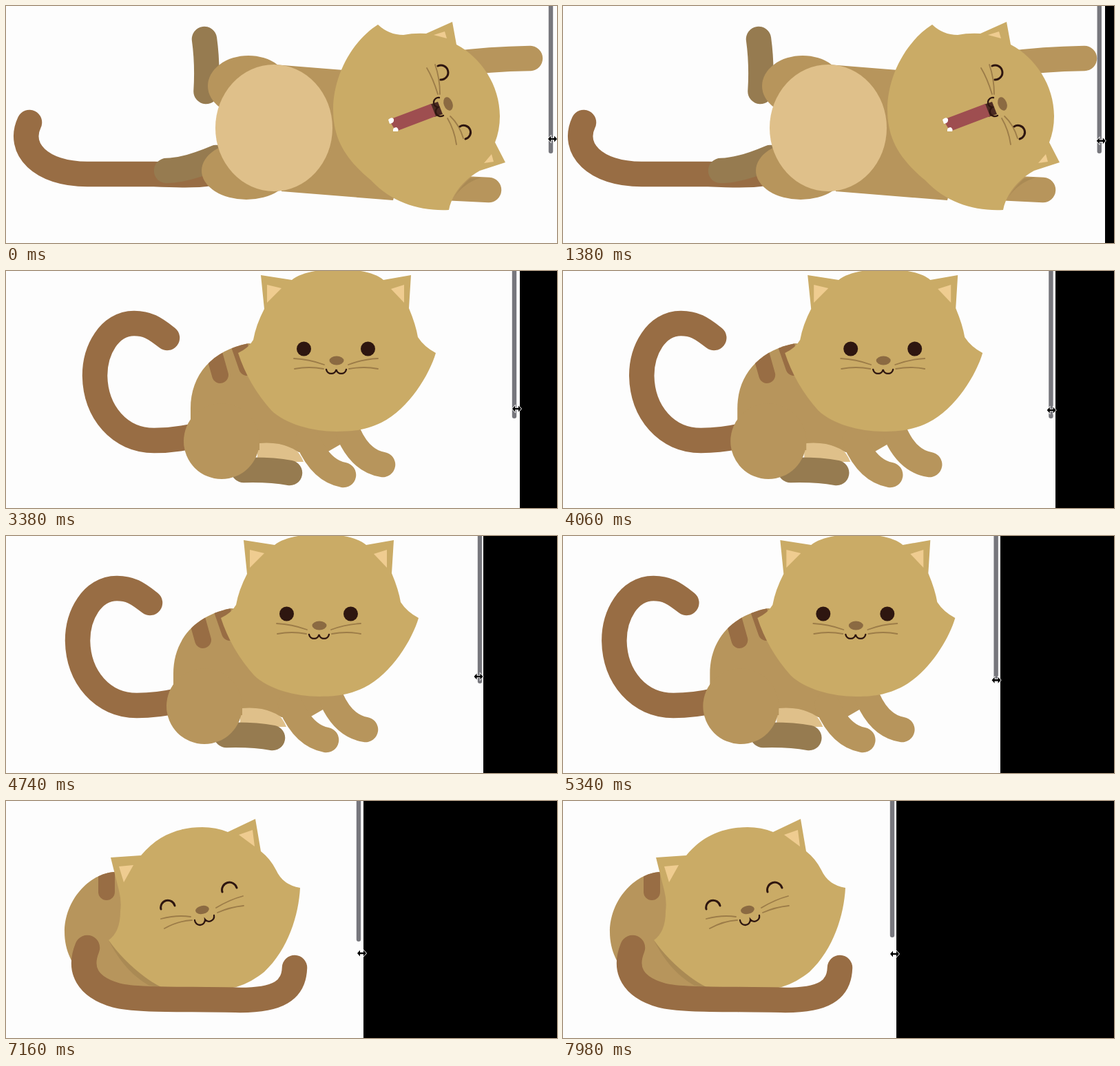
These frames come from a looping animation (800x344 px, 8 s). An HTML page:

```html
<!DOCTYPE html>
<html lang="en">
<head>
<meta charset="utf-8">
<title>Resizing cat</title>
<style>
  html, body { margin: 0; width: 100%; height: 100%; overflow: hidden; background: #fdfdfd; }
  svg { display: block; width: 800px; height: 344px; }
  .page { fill: #fdfdfd; }
  .head { fill: #caab66; }
  .body { fill: #b7955c; }
  .belly { fill: #dfc08a; }
  .ear { fill: #efcc90; }
  .nose { fill: #8b6a42; }
  .eye { fill: #2e1610; }
  .shade { fill: #aa8a54; }
  .limb { fill: none; stroke-width: 36.5; stroke-linecap: round; }
  .tail { stroke: #986d44; }
  .leg { stroke: #967b50; }
  .arm { stroke: #b7955c; }
  .stripe { fill: none; stroke: #986d44; stroke-width: 24; stroke-linecap: round; }
  .line { fill: none; stroke: #2e1610; stroke-width: 3; stroke-linecap: round; }
  .thin { stroke-width: 2.3; }
  .whisker { fill: none; stroke: #9c7c48; stroke-width: 1.8; stroke-linecap: round; }
</style>
</head>
<body>
<svg viewBox="0 0 800 344">
  <defs>
    <clipPath id="sitBack"><path d="M352 105C300 115 268 150 268 200V300H480V120Z"/></clipPath>
    <clipPath id="curlBack"><path d="M158 103C120 105 85 145 85 190C85 230 110 260 140 272H250L165 120Z"/></clipPath>
  </defs>
  <rect class="page" width="800" height="344"/>

  <g id="lying">
    <path class="limb tail" d="M34 169C16 207 50 244 118 244H215C260 246 285 246 305 241"/>
    <path class="limb leg" d="M233 239Q260 239 305 220M288 48Q293 84 290.5 124"/>
    <ellipse class="body" cx="352" cy="116" rx="59" ry="44"/>
    <ellipse class="body" cx="349" cy="239" rx="65" ry="42"/>
    <path class="body" d="M390 85L490 93L600 140L562 282L400 269Z"/>
    <ellipse class="belly" cx="389" cy="177" rx="85" ry="92"/>
    <path class="limb arm" d="M650 84Q700 77 761 76M640 264L701 267"/>
    <path class="shade" d="M651 277Q660 262 674 250L690 249Q666 256 651 277Z"/>
    <path class="head" d="M540 27Q556 42 577 42Q592 39 610 40L648 23L654 56C690 75 717 115 717 160Q717 180 710 198L725 227L688 239C668 250 648 270 643 296C600 298 560 285 530 253C490 220 475 190 475 150C475 102 502 51 540 27Z"/>
    <path class="ear" d="M621 42L637 37L640 47ZM694 228L705 215L708 226Z"/>
    <path class="whisker" d="M611 90Q620 105 627 128M623 85Q630 105 630 128M641 163Q651 180 654 201M645 160Q658 172 664 192"/>
    <path d="M615 143L627 139L634 157L622 161Z" fill="#4a2a22"/>
    <path d="M556 165L617 142L624 160L566 182Z" fill="#9e4e50"/>
    <path class="page" d="M555 165Q560 160 563 164Q564 170 557 171ZM562 182Q561 176 567 176Q571 179 569 182Z"/>
    <ellipse class="nose" cx="642" cy="142" rx="6.3" ry="10" transform="rotate(-20 642 142)"/>
    <path class="line" d="M627 87A10.5 10.5 0 1 1 631 107M659 175A10 10 0 1 1 667 193"/>
    <path class="line thin" d="M629 133A7 7 0 0 0 627 147A7 7 0 0 0 635 159"/>
  </g>

  <g id="sitting">
    <path class="limb tail" d="M234 97C215 82 205 76 186 76C150 76 129 115 129 152C130 205 165 246 215 246Q245 246 275 239"/>
    <path class="belly" d="M365 245H402Q425 258 432 277H365Z"/>
    <path class="limb leg" d="M345 289Q385 288 412 293"/>
    <path class="body" d="M352 105C300 115 268 150 268 200V260H368V250Q402 247 425 263H466L485 252L515 232L480 120Z"/>
    <circle class="body" cx="313" cy="247" r="55"/>
    <path class="limb arm" d="M438 245Q457 290 490 296M497 235Q515 276 547 281"/>
    <path class="stripe" clip-path="url(#sitBack)" d="M300 112L311 151M336 100L350 140"/>
    <path class="head" d="M415 13C440 -8 525 -8 548 13L588 6L585 54Q595 78 598 96Q607 110 624 119C615 150 585 200 545 220C520 232 500 233 480 233C445 233 405 222 385 202Q352 165 337 119Q352 112 359 100Q363 78 375 55L370 6Z"/>
    <path class="ear" d="M379 20L400 25L379 46ZM578 20L559 26L578 46Z"/>
    <path class="whisker" d="M418 127Q440 128 462 136M419 142Q440 138 461 142M540 127Q518 128 497 136M540 142Q520 138 498 142"/>
    <circle class="eye" cx="432.5" cy="113" r="10.5"/>
    <circle class="eye" cx="525.5" cy="113" r="10.5"/>
    <ellipse class="nose" cx="480" cy="130" rx="10.5" ry="6.5"/>
    <path class="line thin" d="M465 143A7.4 7.4 0 0 0 479.5 143A7.4 7.4 0 0 0 494 143"/>
  </g>

  <g id="curled">
    <path class="body" d="M158 103C120 105 85 145 85 190C85 230 110 260 140 272H250L165 120Z"/>
    <path class="stripe" clip-path="url(#curlBack)" d="M146 95V132"/>
    <path class="shade" d="M149 202Q172 248 208 268L232 271L170 200Z"/>
    <path class="head" d="M196 79C222 47 255 38 285 38Q305 38 322 45L362 26L370 73Q384 84 392 100Q402 122 427 126C425 165 410 215 375 248Q350 268 325 272L225 270C195 255 165 225 149 202Q166 190 166 160Q168 145 164 130L152 82Z"/>
    <path class="ear" d="M164 95L185 93L171 118ZM338 49L358 42L361 66Z"/>
    <path class="whisker" d="M225 171Q248 165 268 168M230 185Q250 174 270 173M305 155Q325 143 344 138M307 162Q325 154 345 152"/>
    <ellipse class="nose" cx="285" cy="158" rx="10" ry="6" transform="rotate(-12 285 158)"/>
    <path class="line" d="M225 157A10 10 0 1 1 245 152M314 132A10 10 0 1 1 335 126"/>
    <path class="line thin" d="M274 173A7.4 7.4 0 0 0 289 172A7.4 7.4 0 0 0 302 166"/>
    <path class="limb tail" d="M118 213C105 245 118 270 160 282C190 290 260 287 340 289C395 289 418 275 419 242"/>
  </g>

  <rect id="bar" y="-10" width="6.4" rx="3.2" fill="#00000c" opacity=".53"/>
  <g id="outside">
    <rect class="page" x="-2" width="2" height="344"/>
    <rect width="800" height="344"/>
  </g>
  <path id="cursor" d="M-6.5 0L-2.5 -4.5V-1.2H2.5V-4.5L6.5 0L2.5 4.5V1.2H-2.5V4.5Z" stroke="#fdfdfd" stroke-width="1.6" paint-order="stroke"/>
</svg>
<script>
const LOOP = 8000;
const $ = id => document.getElementById(id);

// [step, scrollbar x]
const barKeys = [[1, 791], [17, 783], [21, 783], [38, 775], [55, 764], [74, 738], [92, 700], [102, 688],
  [110, 650], [128, 586], [131, 581], [146, 521], [155, 512], [164, 492], [172, 478]];
// [step, window edge from bar, bar bottom, cursor from bar, cursor y]
const detailKeys = [[1, 9, 214, 2.5, 193], [55, 7, 214, 2.5, 198], [74, 8, 214, 3.5, 200], [102, 5, 214, -2, 204],
  [131, 7, 209, 3, 215], [155, 6.5, 204, 4.5, 221], [172, 5.5, 198, 3.5, 222]];

// pose, last step exclusive, bar x at which it is drawn unshifted, furthest shift
const poses = [['lying', 56, 791, -4], ['sitting', 146, 738, -999], ['curled', Infinity, 512, -999]];

function sample(keys, step) {
  let i = 1;
  while (i < keys.length - 1 && keys[i][0] < step) i++;
  const a = keys[i - 1], b = keys[i];
  const k = Math.min(1, (step - a[0]) / (b[0] - a[0]));
  return a.slice(1).map((v, j) => v + (b[j + 1] - v) * k);
}

// Steps come in threes, lasting 20, 20 and 100 ms.
function stepAt(ms) {
  const t = ms + 20, rest = t % 140;
  return Math.floor(t / 140) * 3 + (rest < 20 ? 0 : rest < 40 ? 1 : 2);
}

const move = (id, x, y = 0) => $(id).setAttribute('transform', `translate(${x} ${y})`);

function draw(ms) {
  const step = stepAt(ms);
  const [bar] = sample(barKeys, step);
  const [edgeGap, bottom, cursorGap, cursorY] = sample(detailKeys, step);
  const current = poses.find(([, end]) => step < end);
  for (const pose of poses) {
    const [id, , home, limit] = pose;
    $(id).style.display = pose === current ? '' : 'none';
    move(id, Math.max(limit, (bar - home) / 2));
  }
  $('bar').setAttribute('x', bar - 3.2);
  $('bar').setAttribute('height', bottom + 10);
  move('outside', Math.round(bar + edgeGap));
  move('cursor', bar + cursorGap, cursorY);
}

const start = performance.now();
function tick() {
  draw((performance.now() - start) % LOOP);
  requestAnimationFrame(tick);
}
tick();
</script>
</body>
</html>
```
